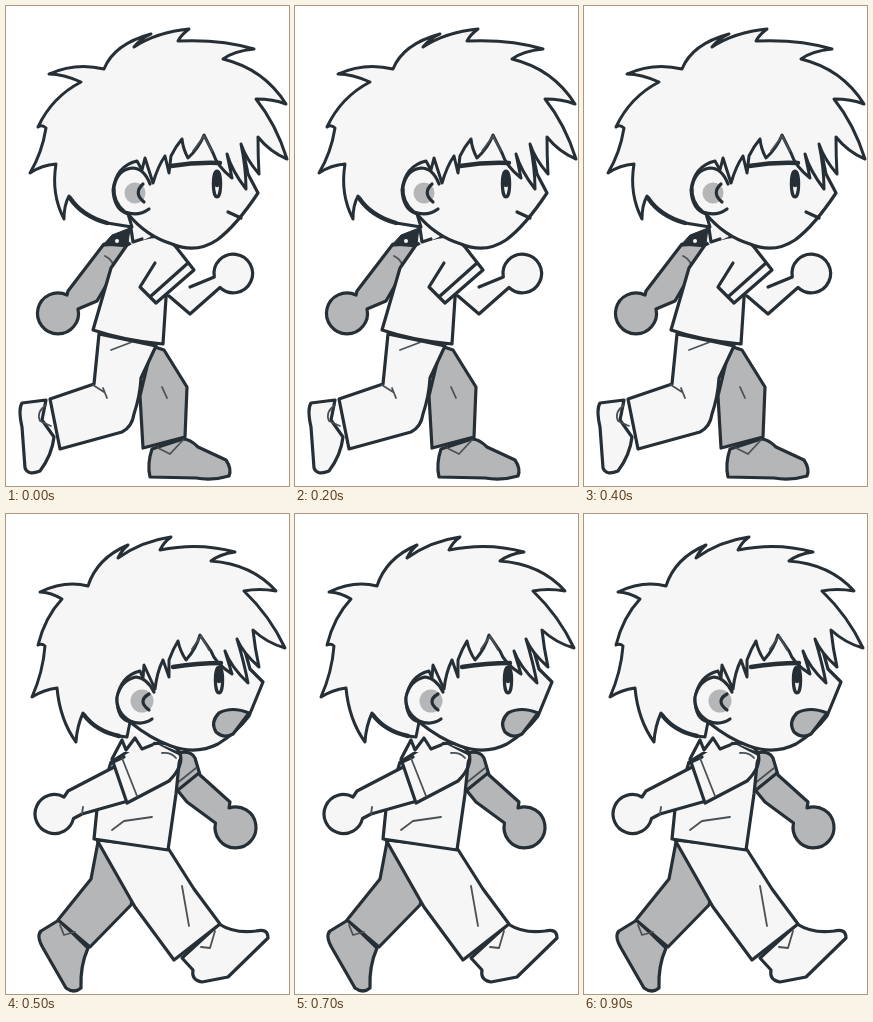
An HTML page that plays this animation: 283 px wide and 480 px high, repeating every 1000 ms.

```html
<!DOCTYPE html>
<html lang="en">
<head>
<meta charset="utf-8">
<title>Running boy</title>
<style>
  html, body { margin: 0; width: 100%; height: 100%; overflow: hidden; background: #fff; }
  svg { display: block; width: 100%; height: 100%; }
  path, circle, ellipse { fill: #f6f6f6; stroke: #262f36; stroke-width: 3.2; stroke-linejoin: round; stroke-linecap: round; }
  .grey { fill: #b5b6b8; }
  .line { fill: none; }
  .thin { fill: none; stroke: #4a5157; stroke-width: 1.8; }
  .bold { fill: none; stroke-width: 4.4; }
  .bare { stroke: none; }
  .ink { fill: #262f36; stroke-width: 1; }
  .hair { stroke-width: 3; }
  .pose { animation: swap 200ms step-end infinite; }
  .stride { animation-delay: -100ms; }
  @keyframes swap { 0% { opacity: 1; } 50% { opacity: 0; } }
</style>
</head>
<body>
<svg viewBox="0 0 283 480">

  <g class="pose">
    <!-- far arm -->
    <path class="grey" d="M98 238L62 285L61 289A20.5 20.5 0 1 0 72 303L91 295L123 240Z"/>
    <path class="thin" d="M99 250Q108 254 109 266"/>
    <!-- far leg -->
    <path class="grey" d="M146 340L158 344L181 381L179 431L137 442L134 390Z"/>
    <path class="grey" d="M146 443L177 433Q184 433 192 441L220 454Q226 463 223 470Q206 475 190 472L144 471Q141 458 146 443Z"/>
    <path class="thin" d="M152 442L164 448L177 434M156 381L161 392"/>
    <!-- near leg -->
    <path d="M40 394L16 397Q12 403 16 421L19 462Q22 470 34 465Q46 449 48 431L36 414Z"/>
    <path class="thin" d="M40 399Q30 406 34 415L45 420"/>
    <path d="M93 328L88 378L44 393L54 443L116 426Q126 421 128 408Q134 390 135 372L150 340Z"/>
    <path class="thin" d="M87 379L98 386M105 344L126 336M97 382L101 392"/>
    <!-- torso and near arm -->
    <path d="M121 239L105 262L87 324Q120 335 157 338L160 292L168 240L140 229Z"/>
    <path d="M163 290L184 308L214 281.5A19.3 19.3 0 1 0 208.3 271L184 281"/>
    <path class="bare" d="M126 236L150 228L170 241L188 264L150 297L134 281Z"/>
    <path class="line" d="M136 233Q158 225 170 241L188 264L150 297L134 281L149 257M182 257L145 290"/>
    <!-- neck and face -->
    <path class="bare" d="M103 205L126 239L144 231L152 222Z"/>
    <path class="line" d="M124 216L127 236L136 233"/>
    <path d="M115 160L122 208Q140 230 166 238Q190 248 211 234Q230 220 252 187L242 168L232 120L140 120Z"/>
    <path class="ink" d="M96 240L106 229L124 222L122 238Z"/>
    <circle class="bare" cx="111" cy="235" r="2"/>
    <!-- hair -->
    <path class="hair" d="M43 68Q70 56 98 63Q108 38 145 28Q134 33 128 41Q151 26 183 23Q175 29 172 35Q215 33 248 43Q228 45 217 53Q258 63 280 98Q267 93 250 93Q270 118 281 153Q264 146 252 131Q252 150 253 168Q240 153 235 138Q240 162 240 183Q226 165 221 148L226 172Q211 160 207 147L198 129Q193 142 182 152Q177 143 176 133Q170 140 165 150L163 167L159 150Q152 160 147 177L139 152L136 164L131 155Q110 160 107 184Q108 204 122 208L126 221L101 217Q76 210 63 190Q58 199 58 213Q45 188 50 158Q36 159 24 167Q36 147 40 122Q36 118 32 121Q46 91 75 76Q57 68 43 68Z"/>
    <path class="bold" d="M64 192Q76 210 101 217"/>
    <path class="thin" d="M187 145L198 130L206 145"/>
    <!-- ear, eye, mouth -->
    <path d="M143 203Q132 211 119 206Q107 197 108 181Q111 164 126 162Q138 162 144 178"/>
    <circle class="grey bare" cx="129" cy="187" r="10.5"/>
    <path class="line" d="M137 178Q127 187 138 196"/>
    <path class="bold" d="M165 160Q190 156 214 157"/>
    <ellipse cx="211" cy="178" rx="3.6" ry="13"/>
    <path class="bold" d="M211 168L211 179"/>
    <path class="line" d="M222 206L235 212"/>
  </g>

  <g class="pose stride">
    <!-- far arm -->
    <path class="grey" d="M169 240Q184 235 189 244L194 261L224 288L223 294A20.5 20.5 0 1 1 209.5 309L181 288L168 272Z"/>
    <path class="line" d="M172 276L193 259"/>
    <path class="thin" d="M170 270L190 254"/>
    <!-- far leg -->
    <path class="grey" d="M53 406L35 417Q30 422 37 434L60 474Q68 480 75 474Q74 452 82 434Z"/>
    <path class="grey" d="M92 328L85 365L52 406L84 433L125 391L140 340Z"/>
    <path class="thin" d="M54 411L58 421L69 418"/>
    <!-- near leg -->
    <path d="M176 444L187 456Q185 466 196 468L222 463L262 424Q262 414 250 417Q229 420 213 410Z"/>
    <path class="thin" d="M195 433L204 434L209 417"/>
    <path d="M91 326L129 393L168 446L214 410L188 375L162 334Z"/>
    <path class="thin" d="M176 372L183 412"/>
    <!-- torso and near arm -->
    <path d="M105 248L91 295L88 325L162 336L170 280L174 240L140 226Z"/>
    <path class="thin" d="M106 316L118 307L146 303"/>
    <path d="M112 251L62 277L58 283A19.5 19.5 0 1 0 67.5 304.5L76 300L122 287Z"/>
    <path class="thin" d="M77 293L76 300"/>
    <path class="bare" d="M107 248L121 289L163 267L174 242L149 229Z"/>
    <path class="line" d="M146 230Q167 226 174 239Q178 252 163 267L121 289L107 248L118 243"/>
    <path class="thin" d="M116 244L131 282M156 239Q165 238 170 244"/>
    <!-- neck and face -->
    <path class="bare" d="M112 213L118 238L139 238L150 225Z"/>
    <path class="line" d="M106 245L116 226L120 236L129 224L136 235L146 231"/>
    <path d="M118 160L124 208Q145 225 165 232Q190 241 212 230Q230 219 243 202L257 168L244 155L232 112L140 115Z"/>
    <!-- hair -->
    <path class="hair" d="M34 78Q59 66 82 72Q91 44 122 31Q116 36 112 44Q136 27 165 23Q158 28 154 36Q193 28 229 38Q214 40 205 47Q246 50 270 77Q253 74 238 77Q264 102 279 134Q261 129 247 116Q249 135 253 153Q237 139 231 125Q238 148 242 169Q225 153 219 137L226 160Q209 149 205 137L194 121Q190 135 180 146Q174 137 172 127Q167 135 163 146L163 163L157 146Q151 158 149 175L138 151L137 164L134 157Q114 162 111 185Q111 205 124 208L121 223L113 222Q89 217 77 199Q71 212 70 228Q54 206 51 174Q37 176 26 183Q37 158 39 132Q36 129 32 131Q39 103 56 85Q44 78 34 78Z"/>
    <path class="bold" d="M78 201Q90 217 113 222"/>
    <path class="thin" d="M186 135L195 122L203 136"/>
    <!-- ear, eye, mouth -->
    <path d="M146 205Q136 212 124 207Q110 199 111 183Q115 166 130 163Q141 164 148 178"/>
    <circle class="grey bare" cx="136" cy="187" r="11.5"/>
    <path class="line" d="M143 180Q131 187 143 196"/>
    <path class="bold" d="M167 153Q192 149 215 149"/>
    <ellipse cx="213" cy="166" rx="3.6" ry="13"/>
    <path class="bold" d="M213 156L213 167"/>
    <path class="grey" d="M243 199Q226 192 213 199Q204 208 210 218Q218 225 227 220Z"/>
  </g>

</svg>
</body>
</html>
```
